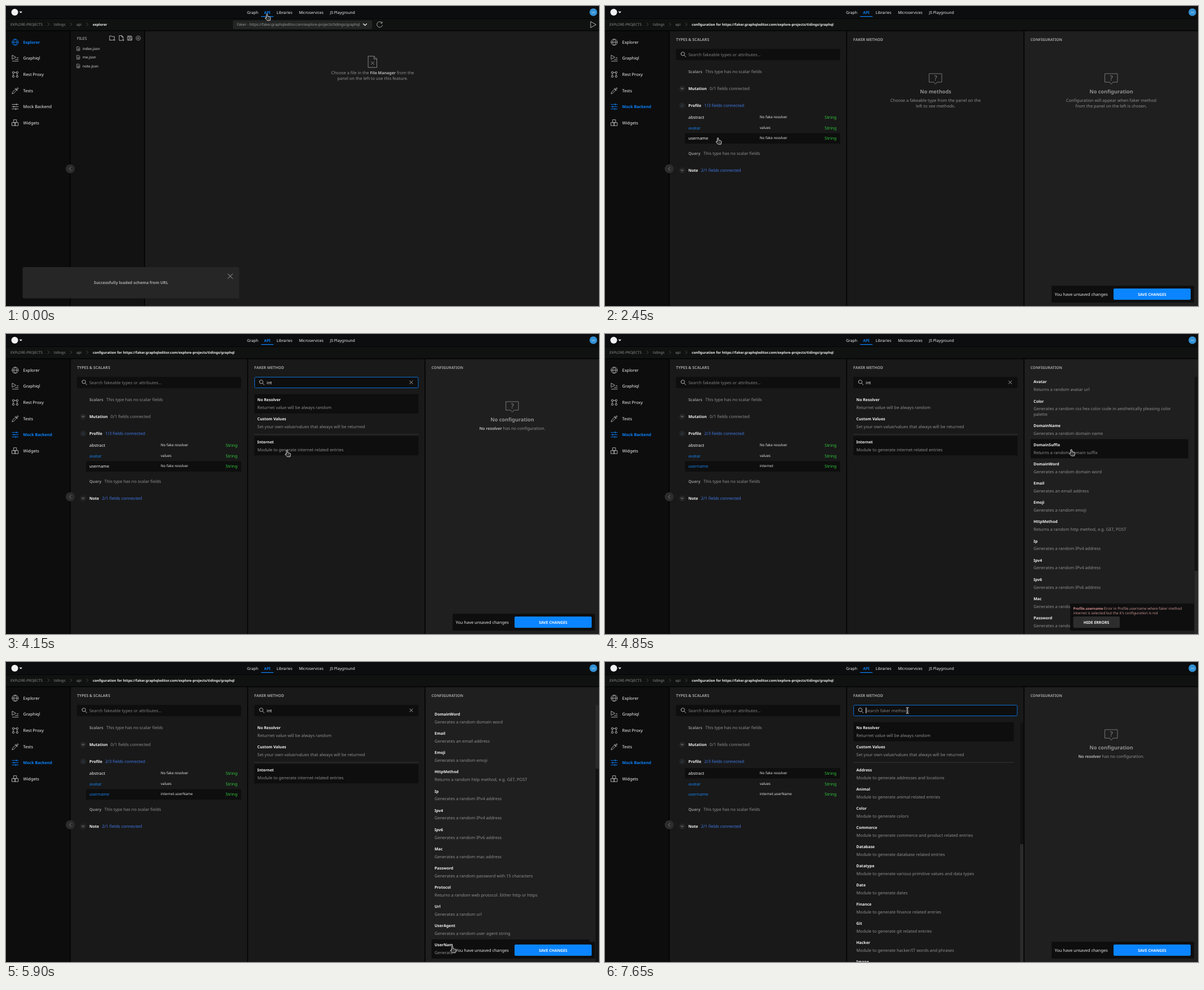
Write an HTML page with a canvas that moves like this. It is 1053x532 px and loops after 8 s.

```html
<!DOCTYPE html>
<html lang="en">
<head>
<meta charset="utf-8">
<title>API explorer</title>
<style>
html, body { margin: 0; width: 100%; height: 100%; overflow: hidden; background: #191919; }
canvas { display: block; width: 1053px; height: 532px; }
</style>
</head>
<body>
<canvas id="stage" width="1053" height="532"></canvas>
<script>
const ctx = document.getElementById('stage').getContext('2d');
const LOOP = 8000, STEP = 50;
const BLUE = '#0a84ff', LINK = '#4079e6', WHITE = '#f2f2f2', GREY = '#8f8f8f', DARK = '#0e0e0e', GREEN = '#2fc83a';
const URL_TEXT = 'https://faker.graphqleditor.com/explore-projects/tidings/graphql';

// start, end, x, y of each pointer move
const MOVES = [
  [500, 1200, 75, 180], [1450, 1900, 120, 178], [2000, 2200, 139, 179], [2250, 2450, 202, 239.5],
  [2700, 2900, 529.5, 86], [3700, 4000, 503, 228], [4000, 4150, 500.5, 212],
  [4450, 4600, 790, 180], [4600, 4650, 829.5, 210.5], [5350, 5500, 811.5, 456],
  [5500, 5600, 794, 510], [6000, 6150, 416, 300], [6350, 6650, 324.5, 203.5], [7250, 7600, 537, 86]
];

const module = (name, what) => [name, 'Module to generate ' + what];
const METHODS = [
  module('Address', 'addresses and locations'), module('Animal', 'animal related entries'),
  module('Color', 'colors'), module('Commerce', 'commerce and product related entries'),
  module('Database', 'database related entries'),
  module('Datatype', 'various primitive values and data types'), module('Date', 'dates'),
  module('Finance', 'finance related entries'), module('Git', 'git related entries'),
  module('Hacker', 'hacker/IT words and phrases'), module('Image', 'images'),
  module('Internet', 'internet related entries'), module('Music', 'music related entries')
];
const CONFIG = [
  ['Avatar', 'Returns a random avatar url'],
  ['Color', 'Generates a random css hex color code in aesthetically pleasing color', 'palette'],
  ['DomainName', 'Generates a random domain name'], ['DomainSuffix', 'Returns a random domain suffix'],
  ['DomainWord', 'Generates a random domain word'], ['Email', 'Generates an email address'],
  ['Emoji', 'Generates a random emoji'], ['HttpMethod', 'Returns a random http method, e.g. GET, POST'],
  ['Ip', 'Generates a random IPv4 address'], ['Ipv4', 'Generates a random IPv4 address'],
  ['Ipv6', 'Generates a random IPv6 address'], ['Mac', 'Generates a random mac address'],
  ['Password', 'Generates a random password with 15 characters'],
  ['Protocol', 'Returns a random web protocol. Either http or https'], ['Url', 'Generates a random url'],
  ['UserAgent', 'Generates a random user agent string'], ['UserName', 'Generates a username']
];

function rect(x, y, w, h, color, r = 0) {
  ctx.fillStyle = color;
  ctx.beginPath();
  ctx.roundRect(x, y, w, h, r);
  ctx.fill();
}
function outline(x, y, w, h, color, r = 0, width = 1) {
  ctx.strokeStyle = color;
  ctx.lineWidth = width;
  ctx.beginPath();
  ctx.roundRect(x, y, w, h, r);
  ctx.stroke();
}
function path(d, x, y, color, width = 0.9) {
  ctx.save();
  ctx.translate(x, y);
  ctx.strokeStyle = color;
  ctx.lineWidth = width;
  ctx.lineJoin = ctx.lineCap = 'round';
  ctx.stroke(new Path2D(d));
  ctx.restore();
}
function circle(x, y, r, color) {
  ctx.fillStyle = color;
  ctx.beginPath();
  ctx.arc(x, y, r, 0, 7);
  ctx.fill();
}
function setFont(size, weight) {
  ctx.font = `${weight} ${size}px "Noto Sans", "Open Sans", sans-serif`;
}
function text(s, x, y, color = GREY, size = 7.5, weight = 400, align = 'left') {
  setFont(size, weight);
  ctx.textAlign = align;
  ctx.fillStyle = color;
  ctx.fillText(s, x, y + size * 0.35);
}
const bold = (s, x, y, color = WHITE, size = 6.95, align = 'left') => text(s, x, y, color, size, 600, align);

// centred line of [string, isBold] parts
function mixed(x, y, parts) {
  const widths = parts.map(([s, b]) => {
    setFont(b ? 7 : 7.5, b ? 600 : 400);
    return ctx.measureText(s).width;
  });
  x -= widths.reduce((a, b) => a + b) / 2;
  parts.forEach(([s, b], i) => {
    b ? bold(s, x, y, '#b4b4b4', 7) : text(s, x, y);
    x += widths[i];
  });
}

function pointerAt(t) {
  let x = 465, y = 20;
  for (const [a, b, px, py] of MOVES) {
    if (t <= a) break;
    const k = Math.min(1, (t - a) / (b - a)), e = k * k * (3 - 2 * k);
    x += (px - x) * e;
    y += (py - y) * e;
  }
  return { x, y, tipY: y - 5 };
}

function stateAt(t) {
  const cleared = t >= 7150;
  const s = {
    t, mouse: pointerAt(t),
    mock: t >= 1500, unsaved: t >= 1700 && (t < 4300 || t >= 5800),
    open: t >= 2250, methods: t >= 2600,
    picked: t >= 4300, done: t >= 5800, config: t >= 4300 && !cleared,
    selected: cleared ? 'abstract' : t >= 2600 ? 'username' : '',
    query: t < 3250 || cleared ? '' : t < 3350 ? 'i' : t < 3450 ? 'in' : 'int',
    focus: (t >= 3050 && t < 4300) || t >= 7650,
    caret: (t >= 3050 && t < 3600) || t >= 7650,
    scroll: t < 4950 ? 0 : t < 5000 ? 84 : 138,
    toast: Math.max(0, Math.min(1, (2100 - t) / 400))
  };
  s.over = (x, y, w, h) => s.mouse.x >= x && s.mouse.x < x + w && s.mouse.tipY >= y && s.mouse.tipY < y + h;
  return s;
}

function header(s) {
  rect(0, 0, 1053, 22, '#0c0d0e');
  rect(0, 22, 1053, 22, '#101111');
  rect(0, 22, 1053, 1, '#030303');
  rect(0, 43, 1053, 1.5, '#020202');
  circle(15.5, 11, 6, '#f2f2f2');
  ctx.fillStyle = WHITE;
  ctx.fill(new Path2D('M23.5 9.7h5.5l-2.75 3z'));
  const tabs = [['Graph', 438], ['API', 464], ['Libraries', 494.5], ['Microservices', 542], ['JS Playground', 597.5]];
  for (const [name, x] of tabs) {
    const on = name === 'API';
    text(name, x, 11.3, on ? BLUE : WHITE, on ? 6.7 : 6.85, on ? 600 : 500, 'center');
  }
  rect(453, 18, 22, 1.2, BLUE);
  circle(1043, 11, 6.8, '#3290d4');
  text('MK', 1043, 11, '#a8d6f5', 4.3, 400, 'center');

  text('EXPLORE-PROJECTS', 8, 33, GREY, 6.25);
  text('tidings', 85, 33, GREY, 6.4);
  text('api', 125, 33, GREY, 6.4);
  for (const x of [75.5, 115.5, 144.5]) path('M-1.3 -2.6L1.3 0L-1.3 2.6', x, 32.5, '#5c5c5c', 0.8);
  bold(s.mock ? 'configuration for ' + URL_TEXT : 'explorer', 154, 33, WHITE, 6.1);
  if (s.mock) return;
  rect(403, 25.5, 247, 15.5, '#232424', 2);
  text('Faker - ' + URL_TEXT, 410, 33.2, '#9c9c9c', 6.5);
  path('M-3 -1.5L0 1.5L3 -1.5', 637.5, 33, WHITE, 1.1);
  path('M4 -3.4A5 5 0 1 0 5 1M4.4 -5V-2.6H1.8', 663.5, 33, '#b5b5b5');
  path('M-4.5 -5.2L4.8 0L-4.5 5.2Z', 1043, 33, '#c8c8c8');
}

const ICONS = {
  Explorer: 'M-5.5 0A5.5 5.5 0 1 0 5.5 0A5.5 5.5 0 1 0 -5.5 0H5.5M0 -5.5C-3.5 -2 -3.5 2 0 5.5C3.5 2 3.5 -2 0 -5.5',
  Graphiql: 'M-5 -5.5L1 -2L-5 1.5ZM-5 5H5.5M0 2H5.5M3 -1H5.5',
  'Rest Proxy': 'M-5 -3.5a1.7 1.7 0 1 0 3.4 0a1.7 1.7 0 1 0 -3.4 0M1.8 -3.5a1.7 1.7 0 1 0 3.4 0a1.7 1.7 0 1 0 -3.4 0M-5 3.5a1.7 1.7 0 1 0 3.4 0a1.7 1.7 0 1 0 -3.4 0M1.8 3.5a1.7 1.7 0 1 0 3.4 0a1.7 1.7 0 1 0 -3.4 0M-1.6 -3.5H1.8M3.5 -1.8V1.8M-3.3 -1.8V1.8',
  Tests: 'M-5.3 5.3L-4.6 2.5L1 -3L3 -1L-2.5 4.6ZM0 -4L4 0M2 -2L4 -5A1.3 1.3 0 0 1 5.3 -3.5L3 -1',
  'Mock Backend': 'M-5.5 -4H5.5M-5.5 0H5.5M-5.5 4H5.5M2 -5.4V-2.6M-2.5 -1.4V1.4M1 2.6V5.4',
  Widgets: 'M-2.5 -5.5H2.5V-.5H-2.5ZM-5.5 -.5H0V5H-5.5ZM0 -.5H5.5V5H0Z'
};
function sidebar(s) {
  rect(0, 44, 114, 488, '#0d0d0d');
  const active = s.mock ? 'Mock Backend' : 'Explorer';
  Object.entries(ICONS).forEach(([name, d], i) => {
    const y = 64.2 + i * 28.6, on = name === active;
    path(d, 16.3, y, on ? BLUE : '#bdbdbd');
    text(name, 30.5, y, on ? BLUE : WHITE, on ? 7.1 : 7.45, on ? 600 : 500);
  });
}
function handle() {
  circle(114, 288.7, 8, '#2c2c2c');
  path('M1.4 -3L-1.4 0L1.4 3', 114, 288.7, '#8d8d8d', 0.8);
}
const divider = x => rect(x - 0.7, 44, 1.5, 488, '#020202');

function explorer() {
  rect(114, 44, 132, 488, '#121212');
  rect(246, 44, 807, 488, '#1b1b1b');
  divider(114);
  divider(246);
  text('FILES', 126, 57.5, '#c4c4c4', 7.1, 500);
  path('M-4.5 3.5V-4H-1.5L-.5 -2.8H4V.5M-4.5 3.5H1M2 3H5M3.5 1.5V4.5', 188.5, 57, '#c4c4c4');
  path('M1 4H-3.5V-4.5H1L3.5 -2V1M1 -4.5V-2H3.5M2 3.3H5M3.5 1.8V4.8', 204.5, 57, '#c4c4c4');
  path('M-3.7 -3.7H2.5L3.7 -2.5V3.7H-3.7ZM-2 -3.7V-1.3H1.8V-3.7M-2 3.7V.9H2V3.7', 220, 57, '#c4c4c4');
  path('M-3.8 0A3.8 3.8 0 1 0 3.8 0A3.8 3.8 0 1 0 -3.8 0M-1.3 0A1.3 1.3 0 1 0 1.3 0A1.3 1.3 0 1 0 -1.3 0', 234.8, 57, '#858585', 1.1);
  ['index.json', 'me.json', 'note.json'].forEach((name, i) => {
    const y = 75.7 + i * 15.3;
    path('M-2.4 -3.3H1L2.4 -1.9V3.3H-2.4ZM-1 0H1M-1 1.6H1', 128.5, y, '#a9a9a9', 0.8);
    text(name, 136, y, '#dcdcdc', 6.4);
  });
  path('M-7.5 -10H2.5L7.5 -5V10H-7.5ZM2.5 -10V-5H7.5M-2.5 -.2L2.5 4.8M2.5 -.2L-2.5 4.8', 651, 99, '#858585', 1);
  mixed(651, 118.7, [['Choose a file in the ', 0], ['File Manager', 1], [' from the', 0]]);
  text('panel on the left to use this feature.', 651, 128, GREY, 7.5, 400, 'center');
}

function search(x, hint, value, focus, caret) {
  rect(x, 76, 291.5, 20, DARK, 2);
  if (focus) outline(x + 0.5, 76.5, 290.5, 19, '#0c6fd4', 2);
  path('M-4 -1A3.2 3.2 0 1 0 2.4 -1A3.2 3.2 0 1 0 -4 -1M1.6 1.4L4.5 4.5', x + 13, 85.8, '#b0b0b0', 1);
  text(value || hint, x + 22, 86, value ? WHITE : '#808080', 7.5);
  if (caret) {
    setFont(7.5, 400);
    rect(x + 22 + ctx.measureText(value).width, 80.5, 0.9, 10.5, WHITE);
  }
  if (value) path('M-2.7 -2.7L2.7 2.7M2.7 -2.7L-2.7 2.7', x + 278.5, 85.7, '#bcbcbc');
}

function scrollbar(x, y, w, thumbY, thumbH) {
  rect(x, y, w, 532 - y, '#2a2a2a');
  rect(x, thumbY, w, thumbH, '#121212');
}

function empty(x, title) {
  path('M-11 -9H11V6H3L0 9.5L-3 6H-11Z', x, 129, '#777', 1);
  text('?', x, 127.7, '#8a8a8a', 12, 400, 'center');
  bold(title, x, 151.7, '#8f8f8f', 9.1, 'center');
}

function typeGroup(name, note, y, color, chevron) {
  if (chevron) {
    circle(137, y, 5.2, '#252525');
    path(chevron > 0 ? 'M-2 -1L0 1L2 -1' : 'M-2 1L0 -1L2 1', 137, y, chevron > 0 ? '#b5b5b5' : '#27549e', 0.8);
  }
  bold(name, 148, y, chevron ? WHITE : GREY, 7);
  setFont(7, 600);
  text(note, 153.3 + ctx.measureText(name).width, y, color);
}

function types(s) {
  bold('TYPES & SCALARS', 126, 60, '#a0a0a0', 6.9);
  search(126, 'Search fakeable types or attributes...', '', false, false);
  typeGroup('Scalars', 'This type has no scalar fields', 116.7, GREY);
  typeGroup('Mutation', '0/1 fields connected', 146.4, GREY, 1);
  typeGroup('Profile', `${s.picked ? 2 : 1}/3 fields connected`, 176.5, LINK, s.open ? -1 : 1);
  if (s.open) {
    const resolver = s.done ? 'internet.userName' : s.picked ? 'internet' : 'No fake resolver';
    const rows = [['abstract', 'No fake resolver'], ['avatar', 'values'], ['username', resolver]];
    rows.forEach(([name, value], i) => {
      const y = 197.3 + i * 18.7;
      if (s.selected === name || s.over(142, y - 9.3, 275, 18.6)) rect(142, y - 9.3, 275.5, 18.6, DARK);
      text(name, 148, y, value === 'No fake resolver' ? WHITE : '#1680ee', 7.4);
      text(value, 274.7, y - 0.7, '#e6e6e6', 6.4);
      text('String', 411, y, GREEN, 7.45, 400, 'right');
    });
  }
  const below = s.open ? 261.7 : 206.4;
  typeGroup('Query', 'This type has no scalar fields', below, GREY);
  typeGroup('Note', '2/1 fields connected', below + 29.8, LINK, 1);
}

function option([name, ...lines], x, y, w, dark) {
  if (dark) rect(x, y - 10, w, 34 + (lines.length - 1) * 9.3, DARK);
  bold(name, x + 5.3, y);
  lines.forEach((line, i) => text(line, x + 5.3, y + 13.6 + i * 9.5));
}

function methods(s) {
  bold('FAKER METHOD', 440.8, 60, '#a0a0a0', 6.85);
  if (!s.methods) {
    empty(587, 'No methods');
    text('Choose a fakeable type from the panel on the', 587, 167.8, GREY, 7.5, 400, 'center');
    text('left to see methods.', 587, 177.2, GREY, 7.5, 400, 'center');
    return;
  }
  search(441, 'Search faker methods', s.query, s.focus, s.caret);
  const list = METHODS.filter(([name]) => name.toLowerCase().includes(s.query));
  const w = s.query ? 291.5 : 285;
  const row = (item, y, on) => option(item, 441, y, w, on || s.over(441, y - 10, w, 34));
  row(['No Resolver', 'Returnet value will be always random'], 116.8, !s.config);
  row(['Custom Values', 'Set your own value/values that always will be returned'], 150.9, false);
  rect(441, 177.5, w, 1, '#373737');
  list.forEach((item, i) => row(item, 191.3 + i * 34.05, s.config && item[0] === 'Internet'));
  if (!s.query) scrollbar(737, 107, 6, 107, 216);
}

function config(s) {
  bold('CONFIGURATION', 755.5, 60, '#a0a0a0', 6.65);
  if (!s.config) {
    empty(899, 'No configuration');
    if (s.methods) mixed(899, 167.8, [['No resolver', 1], [' has no configuration.', 0]]);
    else {
      text('Configuration will appear when faker method', 899, 167.8, GREY, 7.5, 400, 'center');
      text('from the panel on the left is chosen.', 899, 177.2, GREY, 7.5, 400, 'center');
    }
    return;
  }
  ctx.save();
  ctx.beginPath();
  ctx.rect(745, 76, 308, 456);
  ctx.clip();
  let y = 85 - s.scroll;
  for (const item of CONFIG) {
    const chosen = s.done && item[0] === 'UserName';
    option(item, 755.7, y, 280, chosen || s.over(756, y - 10, 280, 34));
    y += 34.1 + (item.length - 2) * 9.3;
  }
  ctx.restore();
  scrollbar(1047, 76, 5.5, 76 + s.scroll * 0.82, 344);
}

function notice(s) {
  if (s.unsaved) {
    rect(793, 496, 253, 30, DARK, 2);
    text('You have unsaved changes', 798.5, 511.2, '#e6e6e6', 7.45);
    rect(903, 501, 137, 20, BLUE, 2);
    bold('SAVE CHANGES', 971.5, 511.2, '#f3f8ff', 6.85, 'center');
  } else if (s.config) {
    rect(826, 478, 220, 48, DARK, 2);
    bold('Profile.username', 831.5, 487, '#d99292', 6.2);
    text('Error in Profile.username where faker method', 886, 487, '#cc9494', 6.4);
    text('internet is selected but the it\'s configuration is not', 831.5, 494.5, '#cc9494', 6.4);
    rect(831.5, 501, 82.5, 20, '#2d2d2d', 2);
    bold('HIDE ERRORS', 872.5, 511.2, WHITE, 6.9, 'center');
  }
}

function toast(alpha) {
  if (!alpha) return;
  ctx.globalAlpha = alpha;
  rect(29.5, 463, 384.5, 55.5, '#262626', 3);
  bold('Successfully loaded schema from URL', 222, 491, '#a8a8a8', 7.05, 'center');
  path('M-4.2 -4.2L4.2 4.2M4.2 -4.2L-4.2 4.2', 398.2, 479.2, '#b4b4b4');
  ctx.globalAlpha = 1;
}

const HAND = 'M-2.6 1V-4.7A1.1 1.1 0 0 1 -.4 -4.7V-1.5L3.6 -.6Q5 -.2 4.8 1.3L4 5.6H-1.2L-4.8 1.8Q-4.8 .3 -3.4 .6Z';
function pointer(s) {
  const { x, y } = s.mouse;
  if (s.methods && x > 441 && x < 733 && y > 76 && y < 97) {
    const beam = 'M-2 -5H-.8L0 -4.4L.8 -5H2M0 -4.4V4.4M-2 5H-.8L0 4.4L.8 5H2';
    path(beam, x, y, '#111', 2.4);
    path(beam, x, y, '#f0f0f0', 1);
    return;
  }
  ctx.save();
  ctx.translate(x, y);
  ctx.fillStyle = '#202020';
  ctx.fill(new Path2D(HAND));
  ctx.restore();
  path(HAND, x, y, '#dcdcdc', 1);
  path('M.2 1.2V3.6M2 1.4V3.6', x, y, '#9a9a9a', 0.6);
}

function draw(t) {
  const s = stateAt(t);
  ctx.textRendering = 'geometricPrecision';
  rect(0, 0, 1053, 532, '#191919');
  sidebar(s);
  if (s.mock) {
    rect(744, 44, 309, 488, '#1f1f1f');
    [114, 429, 744].forEach(divider);
    types(s);
    methods(s);
    config(s);
  } else {
    explorer();
  }
  header(s);
  handle();
  notice(s);
  toast(s.toast);
  pointer(s);
}

const began = performance.now();
function tick() {
  const t = (performance.now() - began) % LOOP;
  draw(Math.floor(t / STEP) * STEP);
  requestAnimationFrame(tick);
}
tick();
</script>
</body>
</html>
```
